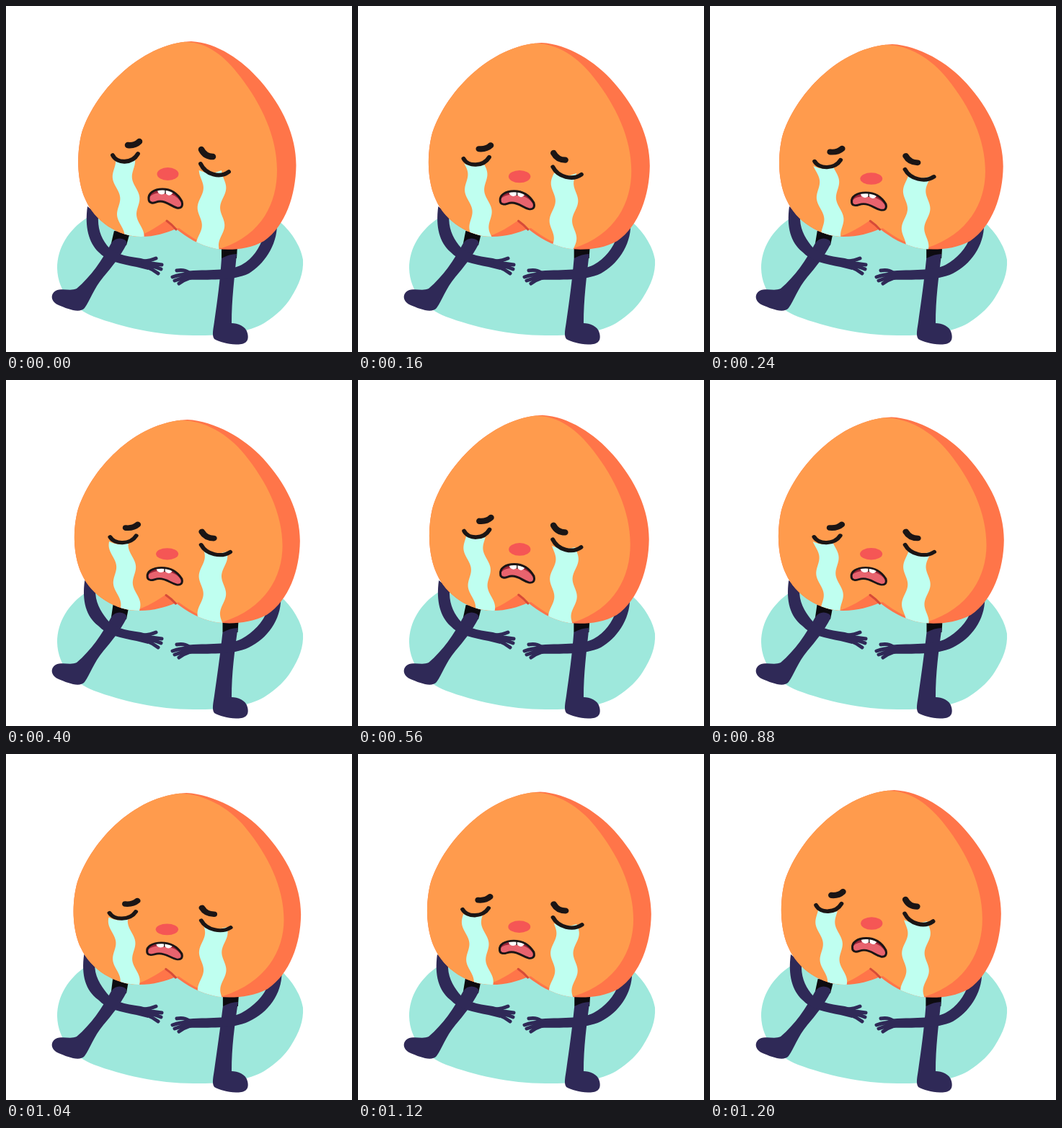
Write an HTML page with a canvas that moves like this. It is 480 px wide and 480 px high and loops after 1.28 s.

```html
<!DOCTYPE html>
<html lang="en">
<head>
<meta charset="utf-8">
<title>Crying peach</title>
<style>
html, body { margin: 0; width: 100%; height: 100%; overflow: hidden; background: #fff; }
canvas { display: block; width: 480px; height: 480px; }
</style>
</head>
<body>
<canvas id="stage"></canvas>
<script>
const LOOP = 1280, STEP = 80, BASE = 320;
const NAVY = '#2f2957', INK = '#1b1515', ORANGE = '#ff9b4d', SHADE = '#ff7549';
const POOL = '#9ee8dc', TEAR = '#bffff0';

const canvas = document.getElementById('stage');
const ctx = canvas.getContext('2d');
const dpr = window.devicePixelRatio || 1;
canvas.width = canvas.height = 480 * dpr;

// [time, value] turning points, eased with a half cosine
const topKeys = [[0, 49], [400, 55], [660, 45.7], [1020, 54.2], [1280, 49]];
const squashKeys = [[0, 0], [360, .8], [640, .03], [1000, 1], [1280, 0]];

function ease(keys, t) {
  const i = keys.findIndex(k => k[0] > t);
  const [t0, a] = keys[i - 1], [t1, b] = keys[i];
  return a + (b - a) * (1 - Math.cos(Math.PI * (t - t0) / (t1 - t0))) / 2;
}

function fill(path, color) {
  ctx.fillStyle = color;
  ctx.fill(new Path2D(path));
}

function line(path, width, color = INK) {
  ctx.strokeStyle = color;
  ctx.lineWidth = width;
  ctx.lineCap = ctx.lineJoin = 'round';
  ctx.stroke(new Path2D(path));
}

// scale about the seat of the peach
function stretched(sx, sy) {
  return new DOMMatrix().translate(250, BASE).scale(sx, sy).translate(-250, -BASE);
}

function within(matrix, draw) {
  ctx.save();
  ctx.transform(matrix.a, matrix.b, matrix.c, matrix.d, matrix.e, matrix.f);
  draw();
  ctx.restore();
}

function drawLimbs(s) {
  const l = -5 * s, r = 7 * s, k = 2 * s;
  // legs
  fill(`M${150 - k} 312L${172 - k} 314L167 332L146 329Z`, '#0d0b10');
  fill(`M146 329Q152 321 161 323Q169 325 167 331C158 348 147 362 135 376C121 393 117 408 109 419
    C102 427 85 420 73 415C62 410 61 400 69 395C78 391 90 396 98 392C118 375 133 353 146 329Z`, NAVY);
  fill(`M${299 + k} 333H${321 + k}L${320 + k} 350H${299 + k}Z`, '#0d0b10');
  fill(`M${299 + k} 350Q${310 + k} 344 ${320 + k} 344C317 378 313 406 313 440C321 440 333 444 335 454
    C338 466 331 470 319 469.5C307 469 296 466 289 462C285 457 288 446 289 438C293 410 297 382 ${299 + k} 350Z`, NAVY);
  // arms
  fill(`M${113 + l} 278C${109 + l} 307 ${115 + l} 328 128 341C140 354 160 358 181 362L197 366L202 354L187 350
    C164 347 148 343 140 332C131 320 ${127 + l} 308 ${128 + l} 290Z`, NAVY);
  line('M191 354Q201 353 208 350M190 356Q204 357 216 359M192 358Q206 361 215 365M193 361Q203 365 211 371', 5, NAVY);
  fill(`M${376 + r} 303C${376 + r} 333 ${357 + r} 359 337 371C314 382 280 379 253 380L248 368
    C280 365 311 368 327 359C343 350 ${351 + r} 337 ${358 + r} 318Z`, NAVY);
  line('M254 370Q247 365 237 367M254 372Q242 372 231 376M254 375Q243 378 234 381M256 377Q247 380 240 385', 5, NAVY);
}

function outline(tip) {
  return `M${tip} 49C${tip + 36} 51 328 75 353 104C384 140 402.5 180 402.5 221C402 262 388 305 358 326
    C337 338 312 339 292 337C267 332 251 321 236 309C222 315 207 320 187 320
    C156 320 123 299 110 268C100 246 97 212 104 180C120 122 ${tip - 72} 52 ${tip} 49Z`;
}

function drawBody(tip, s) {
  const e = 4 * s;
  const shape = outline(tip);
  fill(shape, SHADE);
  ctx.save();
  ctx.clip(new Path2D(shape));
  fill(`M${tip - 8} 50C${tip + 22} 50 ${303 + e} 69 ${325 + e} 98C${355 + e} 137 ${376 + e} 182 ${376 + e} 228
    C${376 + e} 272 356 317 299 336C276 333 258 322 240 308L236 309L223 297C210 306 198 314 184 319
    L90 340V40H${tip - 8}Z`, ORANGE);
  ctx.restore();
  line('M223 298Q230 303 236 310', 3, '#d64b38');
}

function drawTear(x, top, half, drift, crest, phase) {
  const center = y => x + (y - top) * drift +
    3.6 * Math.cos(2 * Math.PI * ((y - crest) / 52 - phase));
  ctx.beginPath();
  for (let y = top; y <= 342; y += 2) ctx.lineTo(center(y) - half, y);
  for (let y = 342; y >= top; y -= 2) ctx.lineTo(center(y) + half, y);
  ctx.quadraticCurveTo(center(top), top + 7, center(top) - half, top);
  ctx.fillStyle = TEAR;
  ctx.fill();
}

function drawFace() {
  line('M169 193Q179 194 185 188', 8.5);
  line('M271 199Q276 209 287 209', 8.5);
  line('M148 207C154 219 175 219 183 205', 5.8);
  line('M270 219C277 234 297 239 309 230', 5.8);
  ctx.fillStyle = '#f55655';
  ctx.beginPath();
  ctx.ellipse(224.5, 233, 15, 9, 0, 0, 7);
  ctx.fill();

  const mouth = `M198 268C197 260 205 254 217 254C230 254 238 260 244 271C246 279 242 281 237 280
    C229 278 224 271 214 271C208 271 206 274 202 273Q198 272 198 268Z`;
  fill(mouth, '#9c2638');
  ctx.save();
  ctx.clip(new Path2D(mouth));
  fill('M196 270C201 258 216 258 228 261C238 264 244 271 247 284H196Z', '#e8636e');
  fill('M209 252L211 259Q216 264 221 259Q226 266 231 260L232 252Z', '#fff');
  line('M221 253V260', 1.3);
  ctx.restore();
  line(mouth, 3);
}

function draw(t) {
  const s = ease(squashKeys, t);
  const lift = ease(topKeys, t) - 49;
  const tip = 257 - 7 * s;
  const bodyShape = stretched(1 + .046 * s, 1 - lift / 271);
  const faceShape = stretched(1 + .046 * s, 1 - .125 * s);
  const lid = (x, y) => faceShape.transformPoint(new DOMPoint(x, y));

  ctx.setTransform(dpr, 0, 0, dpr, 0, 0);
  ctx.fillStyle = '#fff';
  ctx.fillRect(0, 0, 480, 480);
  fill(`M112 294C86 311 71 336 71 364C72 397 94 420 122 431C160 445 210 457 260 457
    C300 458 335 453 358 440C377 428 388 416 395 405C407 386 413 370 412 352C409 333 395 311 376 296Z`, POOL);
  drawLimbs(s);
  within(bodyShape, () => drawBody(tip, s));

  ctx.save();
  const clip = new Path2D();
  clip.addPath(new Path2D(outline(tip)), bodyShape);
  ctx.clip(clip);
  // the flow speeds up while the peach sinks
  const phase = t / 640 + .3 * s;
  const left = lid(162, 214), right = lid(287, 228);
  drawTear(left.x, left.y, 13.5, .12, 265, phase);
  drawTear(right.x, right.y, 15.7, -.04, 253, phase);
  ctx.restore();

  within(faceShape, drawFace);
}

function tick() {
  draw(Math.floor(performance.now() / STEP) * STEP % LOOP);
  requestAnimationFrame(tick);
}
tick();
</script>
</body>
</html>
```
